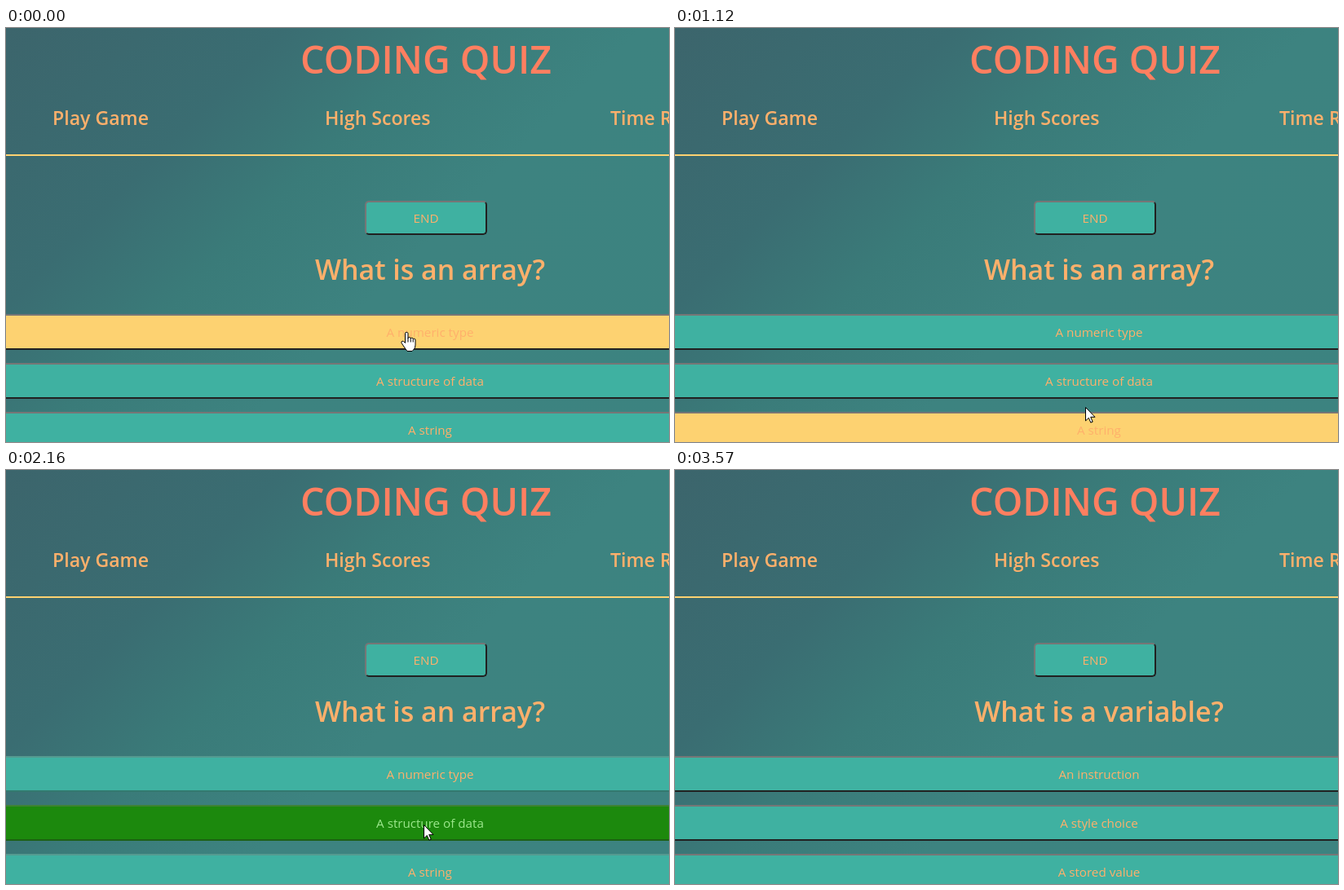
An HTML page for the animation above (4250 ms loop, 813x508 px).

```html
<!DOCTYPE html>
<html lang="en">
<head>
<meta charset="utf-8">
<title>Coding Quiz</title>
<style>
:root {
  --teal: #3fb1a1;
  --yellow: #fdd271;
  --orange: #ffb06b;
  --loop: 4250ms infinite;
}
html, body { margin: 0; width: 100%; height: 100%; overflow: hidden; }
body {
  position: relative;
  color: var(--orange);
  background: linear-gradient(135deg, #3c656c, #3a6d72 26%, #3a7b79 41%, #3d8380 59%, #3c8380);
  font: 400 15.2px "Open Sans", "Noto Sans", sans-serif;
}
body > * { position: absolute; box-sizing: border-box; margin: 0; white-space: nowrap; }
h1, h2, nav { font-weight: 600; }
h1 { left: 115px; top: 18px; width: 800px; font-size: 46.5px; line-height: 40px; color: #ff7f60; text-align: center; }
h2 { left: 120px; top: 276px; width: 800px; height: 40px; font-size: 33.9px; line-height: 40px; }
nav { top: 95px; font-size: 23.1px; line-height: 30px; }
hr { left: 0; top: 155px; width: 100%; height: 2px; border: 0; background: var(--yellow); }

.btn {
  border: 2px solid;
  border-color: #767676 #212121 #212121 #767676;
  border-radius: 5px;
  background: var(--teal);
  text-align: center;
}
.end { left: 440px; top: 212px; width: 150px; height: 42px; line-height: 38px; }
.bar { left: -20px; width: 1080px; height: 44px; line-height: 40px; }
.one { top: 351px; animation: one var(--loop), disable var(--loop); }
.two { top: 411px; animation: two var(--loop), disable var(--loop); }
.three { top: 471px; animation: three var(--loop), disable var(--loop); }

.now, .next { position: absolute; inset: 0; text-align: center; }
.now { animation: now var(--loop) step-end; }
.next { animation: next var(--loop) step-end; }
.two .now { animation: now var(--loop) step-end, correct var(--loop); }

svg { left: 0; top: 0; overflow: visible; }
svg path { fill: #fff; stroke: #000; stroke-linejoin: round; }
.pointer { animation: move var(--loop) linear; }
.hand { animation: hand var(--loop) step-end; }
.arrow { animation: arrow var(--loop) step-end; }

@keyframes one {
  0%, 1.41% { background: var(--yellow); }
  6.12%, 100% { background: var(--teal); }
}
@keyframes two {
  0%, 4.94% { background: var(--teal); }
  9.65%, 14.7% { background: var(--yellow); }
  19.4%, 27.76% { background: var(--teal); }
  32%, 48% { background: var(--yellow); }
  52.7%, 81.41% { background: #008000; }
  83.9%, 100% { background: var(--teal); }
}
@keyframes three {
  0%, 19.29% { background: var(--teal); }
  22.5%, 27.6% { background: var(--yellow); }
  32%, 100% { background: var(--teal); }
}
@keyframes disable {
  0%, 48%, 81.42%, 100% { border-color: #767676 #212121 #212121 #767676; }
  52.7%, 81.41% { border-color: #7676764d #2121214d #2121214d #7676764d; }
}
@keyframes correct {
  0%, 48% { color: var(--orange); }
  52.7%, 100% { color: #90ee90; }
}
@keyframes now { 0% { opacity: 1; } 81.41%, 100% { opacity: 0; } }
@keyframes next { 0% { opacity: 0; } 81.41%, 100% { opacity: 1; } }
@keyframes hand {
  0%, 4.7%, 19.29%, 27.76% { opacity: 1; }
  1.41%, 14.4%, 26.35%, 48%, 100% { opacity: 0; }
}
@keyframes arrow {
  0%, 4.7%, 19.29%, 27.76%, 84%, 100% { opacity: 0; }
  1.41%, 14.4%, 26.35%, 48% { opacity: 1; }
}
@keyframes move {
  0%, 1.4% { transform: translate(491px, 373px); }
  1.42% { transform: translate(489px, 398px); }
  4.7% { transform: translate(485px, 413px); }
  6.82%, 8.2% { transform: translate(484px, 432px); }
  12.5% { transform: translate(487px, 442px); }
  14.4% { transform: translate(490px, 455px); }
  17.88%, 19.2% { transform: translate(495px, 470px); }
  22%, 26.3% { transform: translate(502px, 484px); }
  26.35%, 27.7% { transform: translate(503px, 465px); }
  27.76% { transform: translate(506px, 452px); }
  32%, 100% { transform: translate(512px, 435px); }
}
</style>
</head>
<body>
<h1>CODING QUIZ</h1>
<nav style="left:57px">Play Game</nav>
<nav style="left:391px">High Scores</nav>
<nav style="left:741px">Time Remaining</nav>
<hr>
<div class="btn end">END</div>
<h2><span class="now">What is an array?</span><span class="next">What is a variable?</span></h2>
<div class="btn bar one"><span class="now">A numeric type</span><span class="next">An instruction</span></div>
<div class="btn bar two"><span class="now">A structure of data</span><span class="next">A style choice</span></div>
<div class="btn bar three"><span class="now">A string</span><span class="next">A stored value</span></div>
<svg width="813" height="508">
  <g class="pointer">
    <g class="hand">
      <path d="M-1.5 1.8Q-1.5.3.3.3 2 .3 2 1.8V8Q2 6.5 3.6 6.5 5.2 6.5 5.2 8 5.3 7.2 6.8 7.2 8.2 7.2 8.2 8.8 8.5 8.2 9.7 8.2 11 8.4 11 10V16Q11 20 8.5 22L7 23.5H1Q-1 21-3 18L-6 13.5Q-6.5 11.5-4.8 11.2-3.3 11-1.5 13.5Z"/>
      <path d="M2 8V12.5M5.2 8V12.5M8.2 8.8V12.5"/>
    </g>
    <path class="arrow" d="M.5.5V17L4.3 13.4 6.8 19.2 9.2 18.2 6.7 12.4H12Z"/>
  </g>
</svg>
</body>
</html>
```
